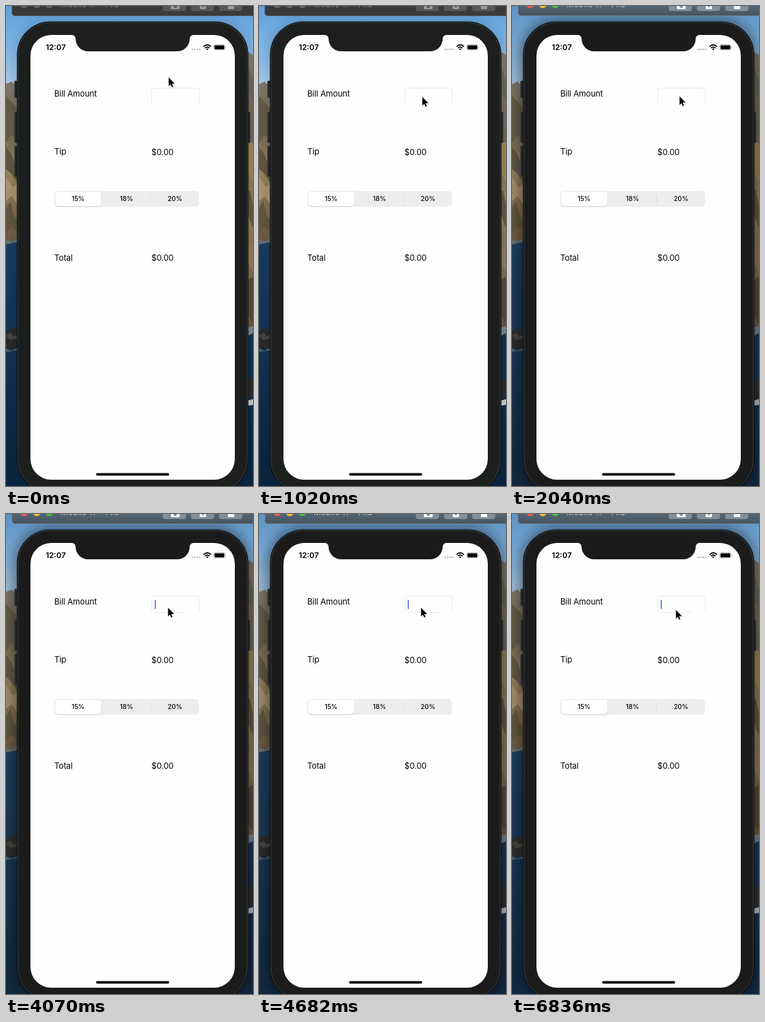
Write an HTML page that moves like this. It is 394 by 763 pixels and loops after 8 s.

```html
<!DOCTYPE html>
<html lang="en">
<head>
<meta charset="utf-8">
<title>Tip calculator</title>
<style>
html, body { margin: 0; width: 100%; height: 100%; overflow: hidden; background: #0d2a48; }
svg { display: block; width: 100%; height: 100%; }
text { font-family: Inter, "Liberation Sans", sans-serif; fill: #000; }
.label { font-size: 12.9px; letter-spacing: -.08px; }
.seg { font-size: 10.3px; font-weight: 500; text-anchor: middle; }
.time { font-size: 12.3px; font-weight: 600; }
.bar { fill: #3a3b3c; }
.edge { stroke: #565758; }
.tool { fill: #57585a; }
.icon { fill: #9b9c9d; }
.light { fill: #626364; }
.title { font-size: 13px; fill: #858687; }
.body { fill: #1c1f1e; }
.shade { opacity: .1; }
.haze { opacity: 0; }
.active .bar { fill: url(#barFill); }
.active .edge { stroke: #70818e; }
.active .tool { fill: #82909b; }
.active .icon { fill: #fff; }
.active .title { fill: #c2cad0; }
.active .red { fill: #f9574f; }
.active .amber { fill: #fbbd2e; }
.active .green { fill: #45c53b; }
.active .body { fill: #1b1b1b; }
.active .shade { opacity: .32; }
.active .haze { opacity: .12; }
</style>
</head>
<body>
<svg id="stage" viewBox="0 0 394 763" preserveAspectRatio="none">
  <defs>
    <linearGradient id="sky" x2="0" y2="1">
      <stop offset="0" stop-color="#5f9fda"/>
      <stop offset=".45" stop-color="#80b6e6"/>
      <stop offset="1" stop-color="#b8d2e6"/>
    </linearGradient>
    <linearGradient id="cliff" x2="0" y2="1">
      <stop offset="0" stop-color="#827b6c"/>
      <stop offset=".3" stop-color="#71664f"/>
      <stop offset=".55" stop-color="#9a855e"/>
      <stop offset="1" stop-color="#6b5a41"/>
    </linearGradient>
    <linearGradient id="sea" x2="0" y2="1">
      <stop offset="0" stop-color="#224d78"/>
      <stop offset=".4" stop-color="#173c62"/>
      <stop offset="1" stop-color="#0b2540"/>
    </linearGradient>
    <linearGradient id="barFill" x2="0" y2="1">
      <stop offset="0" stop-color="#546878"/>
      <stop offset="1" stop-color="#46545f"/>
    </linearGradient>
    <filter id="blur" x="-20%" y="-20%" width="140%" height="140%"><feGaussianBlur stdDeviation="8"/></filter>
    <filter id="soft" x="-20%" y="-30%" width="140%" height="170%"><feGaussianBlur stdDeviation="1.2"/></filter>
    <rect id="phone" x="18" y="25" width="368" height="749" rx="53"/>
    <path id="arrow" d="M0 0V13.7L3.1 10.9L5.1 15.6L7.1 14.8L5.1 10.1H9.6Z"/>
  </defs>

  <g id="wallpaper">
    <rect width="394" height="150" fill="url(#sky)"/>
    <rect y="140" width="394" height="623" fill="url(#sea)"/>
    <path d="M0 124L9 120L20 132V368L9 374L0 371Z" fill="url(#cliff)"/>
    <path d="M0 143L8 151L20 166V212L8 205L0 218Z" fill="#645c48"/>
    <path d="M0 224L9 236L20 270V284L8 266L0 259Z" fill="#625642"/>
    <path d="M0 272L11 288L20 281V318L9 302L0 310Z" fill="#a99470"/>
    <path d="M0 322L7 310L12 333L20 341V358L8 352L0 363Z" fill="#635540"/>
    <path d="M0 371L9 374L20 368V375L0 379Z" fill="#6a716f"/>
    <path d="M0 517L9 511L20 514V541L9 546L0 543Z" fill="#29292a"/>
    <path d="M0 524L7 519L12 525L20 522V528L6 531Z" fill="#47453f"/>
    <path d="M0 544L8 548L20 543V547L0 550Z" fill="#4b6074"/>
    <path d="M380 82L387 73L394 78V511L380 514Z" fill="url(#cliff)"/>
    <path d="M380 112L388 101L394 121V150L386 136L380 145Z" fill="#6b6558"/>
    <path d="M380 210L394 218V282L386 263L380 271Z" fill="#9c875a"/>
    <path d="M380 302L389 292L394 317V353L387 335Z" fill="#665840"/>
    <path d="M380 367L389 382L394 374V423L386 408Z" fill="#927c56"/>
    <path d="M380 440L394 430V505L386 493Z" fill="#594b37"/>
    <path d="M382 512L394 509V520L384 525Z" fill="#778996"/>
    <path d="M382 596L394 590V622L382 627Z" fill="#2b2c2d"/>
    <path d="M382 628L394 625V634L382 636Z" fill="#c2cbd1"/>
    <rect class="haze" width="394" height="763" fill="#48443e"/>
  </g>

  <use href="#phone" class="shade" stroke="#000" stroke-width="14" filter="url(#blur)"/>

  <g id="titlebar">
    <path class="bar edge" d="M9.5 -2V10.5Q9.5 15.5 14.5 15.5H396V-2Z"/>
    <circle class="light red" cx="29" cy="-2.5" r="6"/>
    <circle class="light amber" cx="49" cy="-2.5" r="6"/>
    <circle class="light green" cx="69" cy="-2.5" r="6"/>
    <text class="title" x="87" y="2.3">Mobile 11 – 14.3</text>
    <g class="tool">
      <rect x="250" y="-12" width="37" height="20" rx="4"/>
      <rect x="295" y="-12" width="37" height="20" rx="4"/>
      <rect x="340" y="-12" width="37" height="20" rx="4"/>
    </g>
    <g class="icon">
      <rect x="263" y="-4" width="14" height="9" rx="1.5"/>
      <rect x="309" y="-4" width="10" height="9" rx="1"/>
      <rect x="354" y="-4" width="10" height="9" rx="1"/>
    </g>
    <circle class="tool" cx="270" cy=".5" r="2.6"/>
    <rect class="tool" x="312.5" y="-3" width="3" height="5"/>
  </g>

  <g id="device">
    <g fill="#242729" stroke="#454b4f" stroke-width=".7">
      <rect x="13.5" y="119" width="7" height="27" rx="1.5"/>
      <rect x="13.5" y="168.5" width="7" height="49" rx="1.5"/>
      <rect x="13.5" y="222.5" width="7" height="49" rx="1.5"/>
      <rect x="383" y="168.5" width="6.5" height="49" rx="1.5"/>
    </g>
    <use href="#phone" class="body" stroke="#0b0d0e" stroke-width="1.2"/>
    <rect x="19.2" y="26.2" width="365.6" height="746.6" rx="51.8" fill="none" stroke="#444b50" stroke-width=".8"/>
    <path fill="#fefefe" d="M72 46H105A6 6 0 0 1 111 52A20 20 0 0 0 131 72H273A20 20 0 0 0 293 52A6 6 0 0 1 299 46H332A33 33 0 0 1 365 79V720A33 33 0 0 1 332 753H72A33 33 0 0 1 39 720V79A33 33 0 0 1 72 46Z"/>
  </g>

  <g id="status">
    <text class="time" x="63.5" y="70">12:07</text>
    <g fill="#c0c0c2">
      <circle cx="297.4" cy="69" r="1.4"/><circle cx="301.3" cy="69" r="1.4"/>
      <circle cx="305.2" cy="69" r="1.4"/><circle cx="309.1" cy="69" r="1.4"/>
    </g>
    <g fill="none" stroke="#000" stroke-width="1.8">
      <path d="M315.2 64.5Q321 59.1 326.8 64.5"/>
      <path d="M317.4 66.9Q321 63.5 324.6 66.9"/>
    </g>
    <path d="M319.1 68.3Q321 66.7 322.9 68.3L321 70.3Z"/>
    <rect x="331.4" y="61.4" width="18" height="8.7" rx="2.4" fill="none" stroke="#a2a2a4" stroke-width=".8"/>
    <rect x="332.6" y="62.6" width="15.6" height="6.3" rx="1.3"/>
    <path d="M350.4 64.2Q352 65.8 350.4 67.4Z" fill="#a2a2a4"/>
  </g>

  <g id="form">
    <g class="label">
      <text x="77" y="143.5">Bill Amount</text>
      <text x="77" y="235.5">Tip</text>
      <text x="232" y="236.5">$0.00</text>
      <text x="77" y="404.5">Total</text>
      <text x="232" y="404.5">$0.00</text>
    </g>
    <path d="M232.5 156V134Q232.5 130.5 236 130.5H305Q308.5 130.5 308.5 134V156" fill="none" stroke="#eaeaea"/>
    <path id="underline" fill="none" stroke="#e9e9e9"/>
    <rect id="caret" x="237.3" y="136.5" width="1.7" height="14.5" rx=".8" fill="#4a6fe0"/>
    <rect x="77" y="294" width="231" height="25" rx="6" fill="#ededee"/>
    <rect x="78.5" y="297" width="73.5" height="22" rx="5" fill="#000" opacity=".16" filter="url(#soft)"/>
    <rect x="78.3" y="295.2" width="73.9" height="22.8" rx="5" fill="#fff"/>
    <path d="M230.5 300V312.5" stroke="#dadadc"/>
    <g class="seg">
      <text x="115" y="310.2">15%</text>
      <text x="192.3" y="310.2">18%</text>
      <text x="269.5" y="310.2">20%</text>
    </g>
    <rect x="143.7" y="742.6" width="116.6" height="4" rx="2"/>
  </g>

  <g id="pointer">
    <use href="#arrow" transform="translate(.6 1.2)" opacity=".25" filter="url(#soft)"/>
    <use href="#arrow" stroke="#fff" stroke-width="1.6" paint-order="stroke"/>
  </g>
</svg>
<script>
const LOOP = 8000;
const FOCUS = 2040;
const EDIT = 4070;
const stops = [
  { at: 0, x: 259.5, y: 113.5 },
  { at: 1020, x: 260.5, y: 144.5 },
  { at: FOCUS, x: 267.3, y: 143.5 },
  { at: 3050, x: 275.5, y: 143.5, line: 265 },
  { at: EDIT, x: 258.5, y: 149, line: 237 },
  { at: 5090, x: 261.5, y: 152.5, line: 237 }
];
const el = id => document.getElementById(id);
const stage = el("stage"), pointer = el("pointer"), caret = el("caret"), underline = el("underline");

function draw(t) {
  const stop = stops.filter(s => s.at <= t).pop();
  pointer.setAttribute("transform", `translate(${stop.x} ${stop.y})`);
  stage.classList.toggle("active", t >= FOCUS);
  caret.setAttribute("visibility", t >= EDIT ? "visible" : "hidden");
  underline.setAttribute("d", stop.line ? `M${stop.line} 156.5H287` : "");
}

const start = performance.now();
function tick() {
  draw((performance.now() - start) % LOOP);
  requestAnimationFrame(tick);
}
draw(0);
requestAnimationFrame(tick);
</script>
</body>
</html>
```
